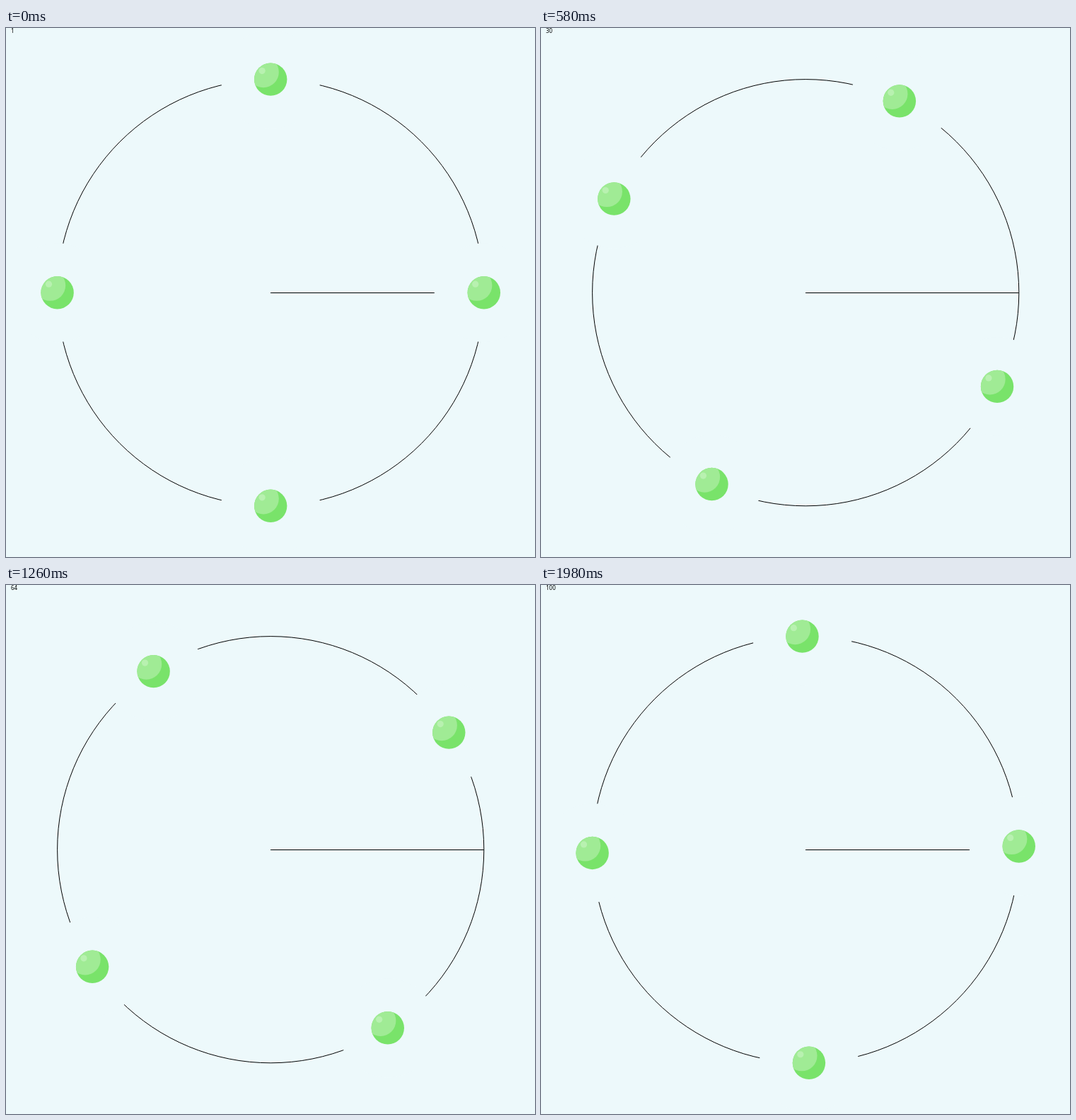
Write an HTML page with a canvas that moves like this. It is 748 px wide and 748 px high and loops after 2000 ms.

```html
<!DOCTYPE html>
<html lang="en">
<head>
<meta charset="utf-8">
<title>Orbiting balls</title>
<style>
html, body { margin: 0; height: 100%; overflow: hidden; background: #edf9fb; }
canvas { display: block; }
</style>
</head>
<body>
<canvas width="748" height="748"></canvas>
<script>
const ctx = document.querySelector('canvas').getContext('2d');
const BG = '#edf9fb';
const CENTER = 374.2, ORBIT = 301.6, BALL = 23.2, GAP = 70;
const STEPS = 100, STEP_MS = 20;

function disc(x, y, r, color) {
  ctx.beginPath();
  ctx.arc(x, y, r, 0, 2 * Math.PI);
  ctx.fillStyle = color;
  ctx.fill();
}

function ball(x, y) {
  disc(x, y, GAP, BG);
  disc(x, y, BALL, '#79e36a');
  ctx.save();
  ctx.clip();
  disc(x - 10.2, y - 10.2, 21.8, '#a0eb95');
  ctx.restore();
  disc(x - 12.1, y - 12, 4.6, '#b8f1b0');
}

function draw(step) {
  ctx.fillStyle = BG;
  ctx.fillRect(0, 0, 748, 748);

  ctx.strokeStyle = '#000';
  ctx.lineWidth = 1;
  ctx.beginPath();
  ctx.arc(CENTER, CENTER, ORBIT, 0, 2 * Math.PI);
  ctx.moveTo(374, 374.5);
  ctx.lineTo(CENTER + ORBIT, 374.5);
  ctx.stroke();

  for (let i = 0; i < 4; i++) {
    const angle = (i + step / STEPS) * Math.PI / 2;
    ball(CENTER + ORBIT * Math.cos(angle), CENTER + ORBIT * Math.sin(angle));
  }

  ctx.fillStyle = '#000';
  ctx.font = '8px "Noto Sans", "Open Sans", sans-serif';
  ctx.fillText(step + 1, 7, 7.4);
}

const start = performance.now();
function tick() {
  draw(Math.floor((performance.now() - start) / STEP_MS) % STEPS);
  requestAnimationFrame(tick);
}
tick();
</script>
</body>
</html>
```
